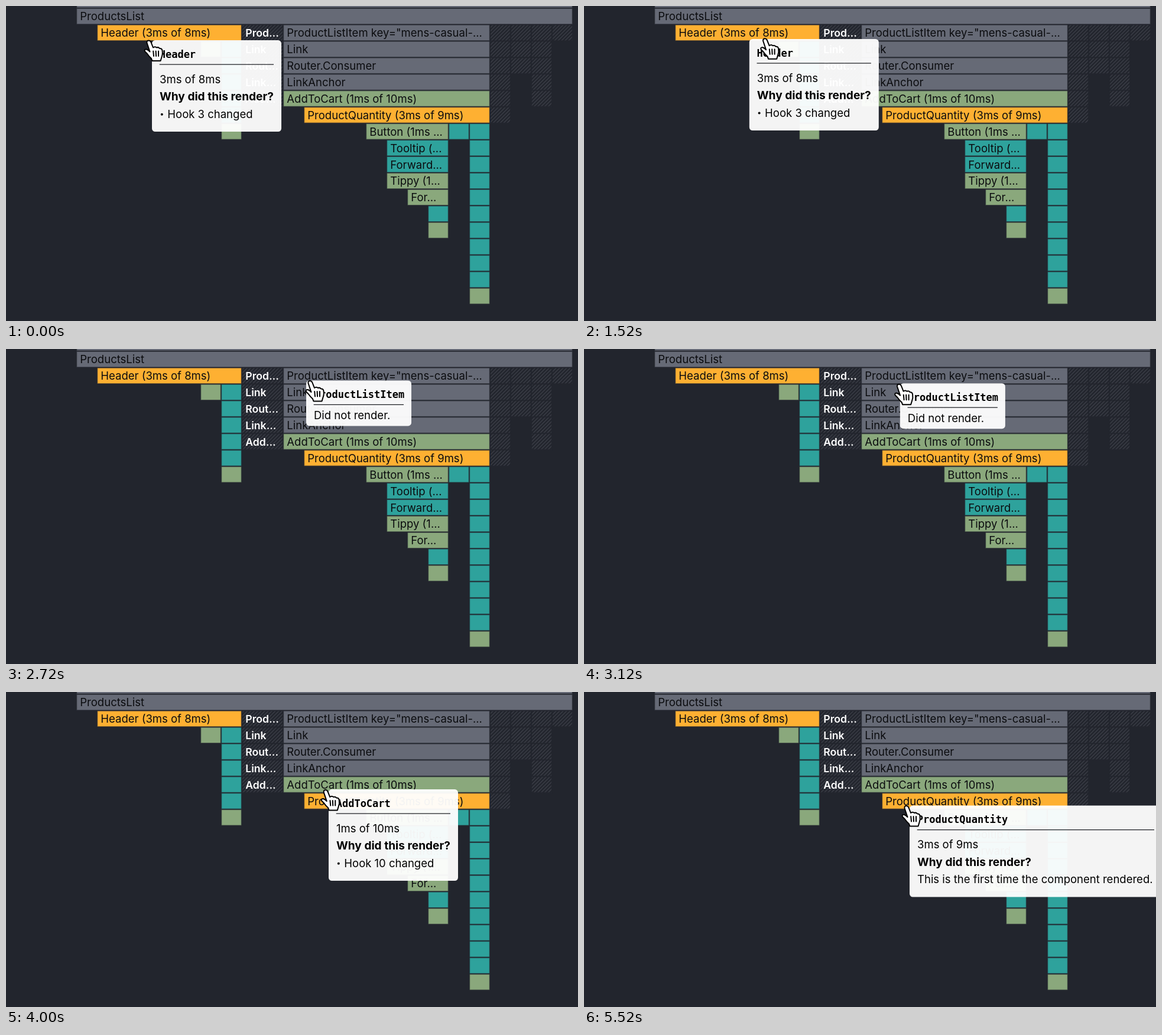
Recreate the animation shown at these times as an HTML page. Size 968x534 px, loop 5600 ms.

```html
<!DOCTYPE html>
<html lang="en">
<head>
<meta charset="utf-8">
<title>Flame graph hover</title>
<style>
  html, body { margin: 0; width: 100%; height: 100%; overflow: hidden; background: #22252d; }
  svg { display: block; width: 968px; height: 534px; }
  text { font: 18.5px Inter, sans-serif; fill: #0b0c0f; white-space: pre; }
  .cell { stroke: #22252d; stroke-opacity: .6; stroke-width: 1.5px; }
  .skipped { font-weight: 600; font-size: 17.6px; fill: #fff; }
  .tip text { fill: #000; }
  .tip .title { font: bold 17px "DejaVu Sans Mono", monospace; }
  .tip .why { font-weight: 700; font-size: 19.1px; }
  .panel { fill: #fff; fill-opacity: .95; }
</style>
</head>
<body>
<svg viewBox="0 0 968 534">
  <defs>
    <pattern id="hatch" width="4.2" height="4.2" patternUnits="userSpaceOnUse" patternTransform="rotate(45)">
      <rect width="1.3" height="4.2" fill="#3d4049"/>
    </pattern>
  </defs>
  <g id="graph"></g>
  <g id="tips"></g>
  <g id="hand" stroke="#000" stroke-width="2" stroke-linejoin="round" stroke-linecap="round">
    <path fill="#fff" d="M-3.5 4Q-4 0-.5 0Q2.2 0 3.4 3L7 12Q10 9.5 13 12Q16 10.8 18 13.5Q22 13 22.5 17.5Q23.5 23 21.5 28L19.5 34.5H5.5L4 30.5Q0 27-3 22.5L-7 18.5Q-8.5 14.5-4 15Q-1 16 1.5 19Z"/>
    <path fill="none" d="M7.2 18l.8 8.5M11.6 18l.4 8.5M16 18v8.5"/>
  </g>
</svg>
<script>
const LOOP = 5600, STEP = 80;
const COL = 35, ROW = 27.9, LEFT = 120, END = 20;
const GRAY = '#666a76', ORANGE = '#feb032', GREEN = '#8aa87c', TEAL = '#2ea29c', HATCH = 'url(#hatch)';
const $ = id => document.getElementById(id);

function add(parent, tag, attrs, content) {
  const el = document.createElementNS('http://www.w3.org/2000/svg', tag);
  for (const k in attrs) el.setAttribute(k, attrs[k]);
  if (content) el.textContent = content;
  return parent.appendChild(el);
}

// Flame graph: bars span whole columns of a regular grid
function bar(row, from, to, fill, label) {
  const x = LEFT + COL * from, y = 4.6 + ROW * row;
  add($('graph'), 'rect', { x: x - .5, y: y - .5, width: COL * (to - from) - 1, height: ROW - 1.1, fill, class: 'cell' });
  if (label) add($('graph'), 'text', { x: x + 5.3, y: y + 19.8, class: fill === HATCH ? 'skipped' : '' }, label);
}
function stack(col, top, bottom, fill) {
  for (let row = top; row <= bottom; row++) bar(row, col, col + 1, fill);
}
function labelled(from, to, fill, labels) {
  labels.forEach((label, i) => bar(i + 1, from, to, fill, label));
}

bar(-1, 0, 24, GRAY);
bar(0, 0, 24, GRAY, 'ProductsList');
bar(1, 1, 8, ORANGE, 'Header (3ms of 8ms)');
stack(6, 2, 2, GREEN);
stack(7, 2, 6, TEAL);
stack(7, 7, 7, GREEN);
labelled(8, 10, HATCH, ['Prod...', 'Link', 'Rout...', 'Link...', 'Add...']);
labelled(10, END, GRAY, ['ProductListItem key="mens-casual-...', 'Link', 'Router.Consumer', 'LinkAnchor']);
bar(5, 10, END, GREEN, 'AddToCart (1ms of 10ms)');
bar(6, 11, END, ORANGE, 'ProductQuantity (3ms of 9ms)');
bar(7, 14, 18, GREEN, 'Button (1ms ...');
bar(8, 15, 18, TEAL, 'Tooltip (...');
bar(9, 15, 18, TEAL, 'Forward...');
bar(10, 15, 18, GREEN, 'Tippy (1...');
bar(11, 16, 18, GREEN, 'For...');
stack(17, 12, 12, TEAL);
stack(17, 13, 13, GREEN);
stack(18, 7, 7, TEAL);
stack(19, 7, 16, TEAL);
stack(19, 17, 17, GREEN);
[6, 3, 5, 1].forEach((depth, i) => stack(END + i, 1, depth, HATCH));

// Tooltips
function tooltip(width, title, time, reason, bullet) {
  const g = add($('tips'), 'g', { class: 'tip' });
  const line = (x, y, s, cls = '') => add(g, 'text', { x, y, class: cls }, s);
  add(g, 'rect', { width, height: time ? 155 : 77, rx: 5.5, class: 'panel' });
  line(12.7, 29.8, title, 'title');
  add(g, 'rect', { x: 12.7, y: 40.4, width: width - 25.7, height: 1.2, fill: '#16181d' });
  if (time) {
    line(13, 72.6, time);
    line(13, 102.1, 'Why did this render?', 'why');
  }
  if (bullet) add(g, 'circle', { cx: 16.8, cy: 125.6, r: 2 });
  line(bullet ? 26.3 : 13, time ? 131.6 : 65.5, reason);
  return g;
}

// Each tooltip follows the hand from start to end, then stays until the next one
const tips = [
  { start: 0, end: 1760, el: tooltip(219, 'Header', '3ms of 8ms', 'Hook 3 changed', true) },
  { start: 2480, end: 3280, el: tooltip(178, 'ProductListItem', '', 'Did not render.') },
  { start: 3920, end: 4560, el: tooltip(219, 'AddToCart', '1ms of 10ms', 'Hook 10 changed', true) },
  { start: 4640, end: LOOP, el: tooltip(427, 'ProductQuantity', '3ms of 9ms', 'This is the first time the component rendered.') }
];

// Stops of the hand: time, x, y
const stops = [
  [0, 242, 58.5], [1360, 243, 57.5], [1760, 402, 52], [2000, 407, 52], [2720, 515, 54],
  [3280, 541, 62], [3680, 541, 83], [3920, 541, 165.5], [4560, 543, 170], [5120, 546, 193], [LOOP, 546, 193]
];

function handAt(t) {
  const i = Math.max(1, stops.findIndex(s => s[0] >= t));
  const [t0, x0, y0] = stops[i - 1], [t1, x1, y1] = stops[i];
  const k = (t - t0) / (t1 - t0);
  return [x0 + (x1 - x0) * k, y0 + (y1 - y0) * k];
}

const move = (el, [x, y], dx = 0, dy = 0) => el.setAttribute('transform', `translate(${x + dx} ${y + dy})`);

function draw(now) {
  const t = Math.floor((now % LOOP) / STEP) * STEP;
  const current = tips.findLast(tip => tip.start <= t);
  for (const tip of tips) tip.el.style.display = tip === current ? '' : 'none';
  const lagged = Math.min(Math.max(t - STEP, current.start), current.end);
  move(current.el, handAt(lagged), 5, -.4);
  move($('hand'), handAt(t));
}

const began = performance.now();
function tick() {
  draw(performance.now() - began);
  requestAnimationFrame(tick);
}
tick();
</script>
</body>
</html>
```
